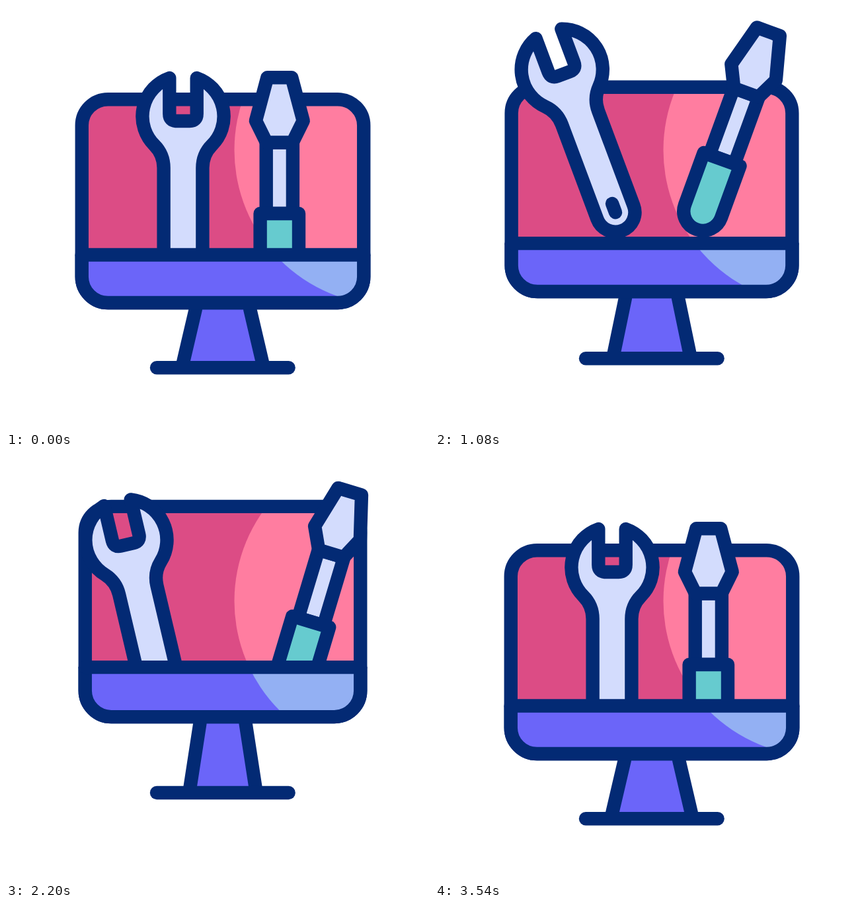
An HTML page that plays this animation: 640x640 px, repeating every 3.6 s.

```html
<!DOCTYPE html>
<html lang="en">
<head>
<meta charset="utf-8">
<title>Computer repair</title>
<style>
  html, body { margin: 0; width: 100%; height: 100%; overflow: hidden; background: #fff; }
  svg { display: block; width: 100vw; height: 100vh; }
  .line { fill: none; stroke: #032a74; stroke-width: 20.4; stroke-linecap: round; stroke-linejoin: round; }
  .steel { fill: #d3dcfd; }
  .teal { fill: #66cbcf; }
  .violet { fill: #6b65f9; }
  .trail { stroke: #ffcc50; }
</style>
</head>
<body>
<svg viewBox="0 0 640 640">
  <defs>
    <clipPath id="screen"><rect class="frame" rx="39.5"/></clipPath>
    <clipPath id="above"><rect id="aboveBox" width="640"/></clipPath>
    <clipPath id="below"><rect id="belowBox" width="640" height="640"/></clipPath>
  </defs>

  <path id="stand" class="violet"/>
  <path id="legs" class="line"/>
  <path id="base" class="line" d="M228 0H427.6"/>

  <g clip-path="url(#screen)">
    <rect width="640" height="640" fill="#dc4c85"/>
    <circle cx="580" cy="218" r="234.5" fill="#ff7da0"/>
  </g>
  <rect class="frame line" rx="39.5"/>

  <!-- Each tool is drawn around the centre of its rounded lower end -->
  <g clip-path="url(#above)">
    <g id="wrench">
      <path class="line steel" d="M-20.7 -288.6V-234.6Q-20.7 -223.6 -10 -223.6H10Q20.7 -223.6 20.7 -234.6V-288.6
        A61.5 61.5 0 0 1 43.5 -187.1C34.5 -178.1 29.4 -165.6 29.4 -152.6V0
        A29.4 29.4 0 0 1 -29.4 0V-152.6C-29.4 -165.6 -34.5 -178.1 -43.5 -187.1
        A61.5 61.5 0 0 1 -20.7 -288.6Z"/>
      <path class="line" d="M0 -14V0"/>
    </g>
    <g id="driver">
      <path class="line steel" d="M-20.1 -191.1H20.1V-83.6H-20.1Z"/>
      <path class="line steel" d="M-18.5 -289.3H18.5L35.9 -223.9 19.7 -191.1H-19.7L-35.9 -223.9Z"/>
      <path class="line teal" d="M-29.2 -83.6H29.2V0A29.2 29.2 0 0 1 -29.2 0Z"/>
    </g>
  </g>

  <g clip-path="url(#below)">
    <g clip-path="url(#screen)">
      <rect class="violet" width="640" height="640"/>
      <circle cx="580" cy="218" r="234.5" fill="#93b0f3"/>
    </g>
    <rect class="frame line" rx="39.5"/>
  </g>
  <path id="divider" class="line"/>

  <path id="trailL" class="line trail" pathLength="1" d="M262 436Q261 468 247 495"/>
  <path id="trailR" class="line trail" pathLength="1" d="M424 436Q425 468 439 495"/>
</svg>
<script>
const LOOP = 3600, CX = 328;

const $ = id => document.getElementById(id);
const set = (el, attrs) => { for (const k in attrs) el.setAttribute(k, attrs[k]); };
const clamp = v => Math.max(0, Math.min(1, v));
const frames = document.querySelectorAll('.frame');

// Eased travel by a given distance between two times
const mover = t => (from, to, by) =>
  by * (1 - Math.cos(Math.PI * clamp((t - from) / (to - from)))) / 2;

// Squash, spring up, hover, drop and land; every measure follows lift and stretch
function drawMonitor(t, move) {
  const lift = 40.5 * (move(600, 1800, 1) - clamp((t - 2114) / 500) ** 2);
  const stretch = move(0, 640, -21.5) + move(640, 1300, 32.5) + move(1600, 2150, 6)
    + move(2150, 2850, -27.5) + move(2850, 3180, 10.5);

  const baseY = 547.3 - lift;
  const bottom = baseY - 98.3 - stretch;
  const height = 307.75 + 0.72 * stretch - 0.04 * lift;
  const half = 213.25 - 0.3 * stretch;
  const top = bottom - height;
  const split = bottom - 0.2356 * height;

  const legTop = 41.3 - 0.4 * stretch;
  const legEnd = 59.5 - 0.36 * stretch - 0.11 * lift;
  const y0 = bottom + 10.2, y1 = baseY - 10.2;
  const leg = (side, u) => `${CX + side * (legTop + (legEnd - legTop) * u)} ${y0 + (y1 - y0) * u}`;

  frames.forEach(el => set(el, { x: CX - half, y: top, width: 2 * half, height }));
  set($('aboveBox'), { height: split });
  set($('belowBox'), { y: split });
  set($('divider'), { d: `M${CX - half} ${split}H${CX + half}` });
  set($('base'), { transform: `translate(0 ${baseY})` });
  set($('stand'), { d: `M${leg(-1, -0.1)}L${leg(1, -0.1)} ${leg(1, 1.1)} ${leg(-1, 1.1)}Z` });
  set($('legs'), { d: `M${leg(-1, 0)}L${leg(-1, 1.05)}M${leg(1, 0)}L${leg(1, 1.05)}` });
}

function place(id, x, y, angle) {
  set($(id), { transform: `translate(${x} ${y}) rotate(${angle})` });
}

// Both tools dip, shoot up while tilting out, drift outward, then fall and settle
function drawWrench(move) {
  const x = move(540, 740, 9) + move(740, 1400, -7.6) + move(1800, 2230, -35)
    + move(2230, 2950, 39.2) + move(2950, 3500, -5.6);
  const y = move(0, 540, 20) + move(540, 815, -105.4)
    + move(1910, 2628, 107) + move(2628, 3000, -21.6);
  const angle = move(540, 860, -20.5) + move(1969, 2573, 22.5)
    + move(2573, 3080, -4.3) + move(3080, 3500, 2.3);
  place('wrench', 268 + x, 397.6 + y, angle);
}

function drawDriver(move) {
  const x = move(560, 740, -10) + move(740, 1540, 4.4) + move(1820, 2250, 30)
    + move(2340, 3080, -26.2) + move(3080, 3260, 1.8);
  const y = move(0, 560, 20) + move(560, 920, -107)
    + move(1999, 2738, 108) + move(2738, 3150, -21);
  const angle = move(560, 1007, 20) + move(2028, 2700, -21.5)
    + move(2700, 3080, 2.3) + move(3080, 3300, -0.8);
  place('driver', 413.8 + x, 397.6 + y, angle);
}

function drawTrail(id, age) {
  const head = clamp(age / 100), tail = clamp((age - 140) / 100);
  set($(id), {
    visibility: head > tail ? 'visible' : 'hidden',
    'stroke-dasharray': `${head - tail} 3`,
    'stroke-dashoffset': -tail
  });
}

function draw(t) {
  const move = mover(t);
  drawMonitor(t, move);
  drawWrench(move);
  drawDriver(move);
  drawTrail('trailL', t - 640);
  drawTrail('trailR', t - 737);
}

const start = performance.now();
function tick() {
  draw((performance.now() - start) % LOOP);
  requestAnimationFrame(tick);
}
tick();
</script>
</body>
</html>
```
